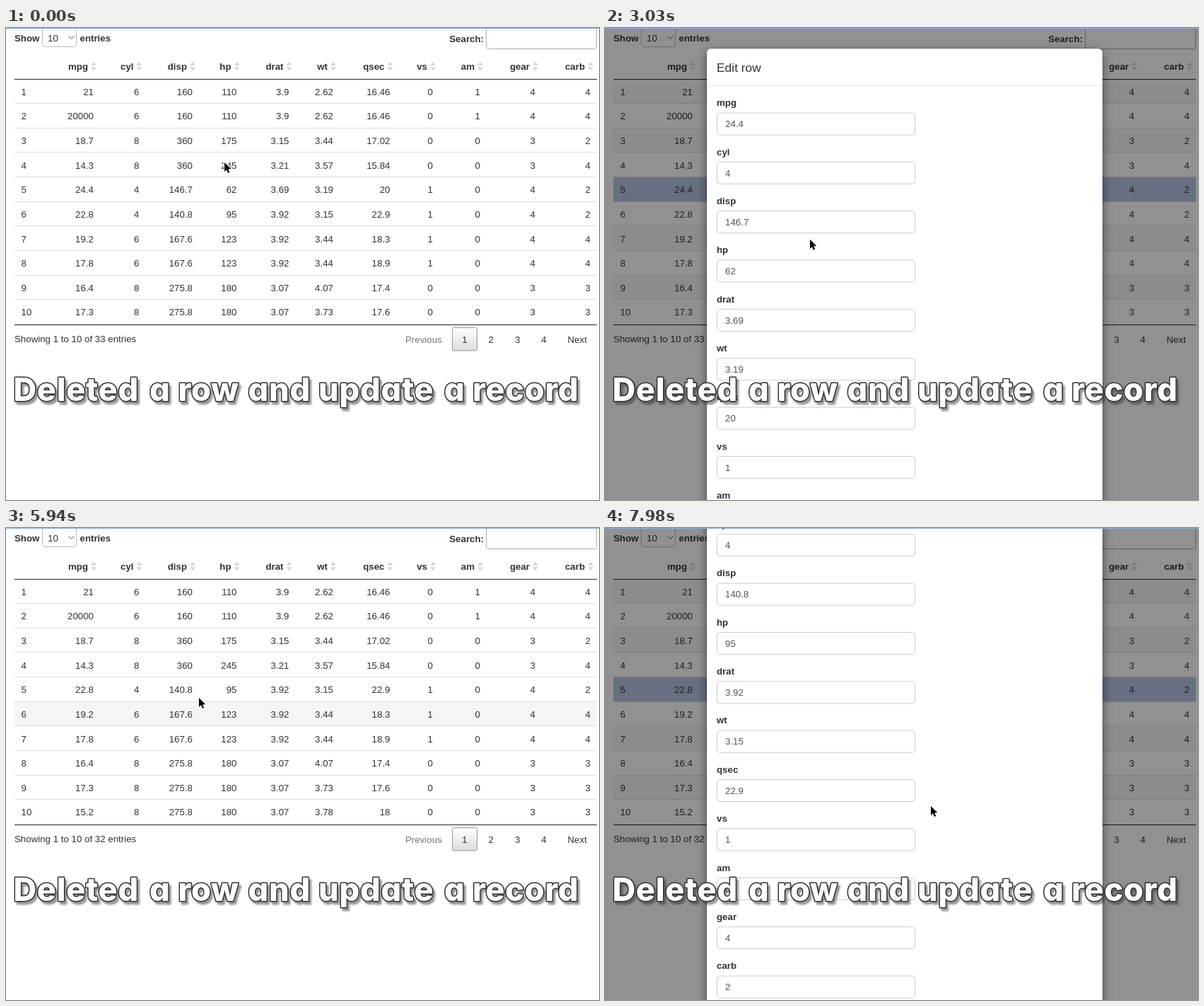
These frames come from a looping animation (839 px wide and 667 px high, 8000 ms). An HTML page with a canvas:

```html
<!DOCTYPE html>
<html lang="en">
<head>
<meta charset="utf-8">
<title>Editable table</title>
<style>
  html, body { margin: 0; width: 839px; height: 667px; overflow: hidden; background: #fff; }
  canvas, svg { position: absolute; left: 0; top: 0; }
  text {
    font: 800 45.2px Inter, sans-serif;
    font-feature-settings: "cv11";
    letter-spacing: .7px;
    fill: #fff; stroke: #333; stroke-width: 3px; paint-order: stroke; stroke-linejoin: round;
    filter: drop-shadow(3px 4px 1px rgba(50, 50, 50, .5));
  }
</style>
</head>
<body>
<canvas id="stage" width="839" height="667"></canvas>
<svg width="839" height="667">
  <text y="527"><tspan x="10.5">Deleted</tspan><tspan x="203">a</tspan><tspan x="243.5">row</tspan><tspan x="342.5">and</tspan><tspan x="442">update</tspan><tspan x="620">a</tspan><tspan x="660">record</tspan></text>
</svg>
<script>
const W = 839, H = 667, LOOP = 8000;
const screen = document.getElementById('stage').getContext('2d');
const layer = new OffscreenCanvas(W, H).getContext('2d');
let ctx = screen;

const HEAD = 72.5, PITCH = 34.65, FIELD = 69.35, MODAL_H = 904.5, MAX_SCROLL = 294.5;
const names = 'mpg cyl disp hp drat wt qsec vs am gear carb'.split(' ');
const rights = [124, 188.5, 264, 326.5, 400.5, 463, 543.5, 604, 671, 749, 827];

// Engine "cyl disp hp drat carb": cars "mpg wt qsec"
const engines = {
  '6 160 110 3.9 4': ['21 2.62 16.46', '20000 2.62 16.46'],
  '8 360 175 3.15 2': ['18.7 3.44 17.02'],
  '8 360 245 3.21 4': ['14.3 3.57 15.84'],
  '4 146.7 62 3.69 2': ['24.4 3.19 20'],
  '4 140.8 95 3.92 2': ['22.8 3.15 22.9'],
  '6 167.6 123 3.92 4': ['19.2 3.44 18.3', '17.8 3.44 18.9'],
  '8 275.8 180 3.07 3': ['16.4 4.07 17.4', '17.3 3.73 17.6', '15.2 3.78 18']
};
const before = Object.entries(engines).flatMap(([engine, cars]) => {
  const [cyl, disp, hp, drat, carb] = engine.split(' ');
  const am = +(disp === '160'), vs = +(cyl < 8 && !am), gear = cyl < 8 ? 4 : 3;
  return cars.map(car => {
    const [mpg, wt, qsec] = car.split(' ');
    return [mpg, cyl, disp, hp, drat, wt, qsec, vs, am, gear, carb];
  });
});
const after = before.filter((_, i) => i !== 4);

// Key times in ms
const OPEN = 2140, REMOVED = 5190, CLOSE = 5230, REOPEN = 6480;
const cursorPath = [
  [0, 309, 190], [1560, 505, 194], [1650, 236, 226], [2610, 236, 226], [3390, 336, 361],
  [3720, 336, 361], [4560, 528, 605], [5280, 545, 632], [5550, 411, 480], [5670, 318, 260],
  [5940, 273, 240], [7000, 282, 205], [7230, 461, 393]
];

const clamp = v => Math.max(0, Math.min(1, v));
const ramp = (t, start, length) => clamp((t - start) / length);
const ease = (t, start, length) => Math.sin(ramp(t, start, length) * Math.PI / 2);

function cursorAt(t) {
  const i = cursorPath.findIndex(k => k[0] > t);
  if (i < 1) return cursorPath.at(i).slice(1);
  const [t0, x0, y0] = cursorPath[i - 1], [t1, x1, y1] = cursorPath[i];
  const u = (t - t0) / (t1 - t0);
  return [x0 + (x1 - x0) * u, y0 + (y1 - y0) * u];
}

function scrollAt(t) {
  return t < 6000
    ? MAX_SCROLL * ease(t, 3455, 750)
    : 110 * ease(t, 7030, 200) + 70.5 * ease(t, 7530, 450);
}

// y is the visual middle of the line
function label(s, x, y, { bold = false, align = 'left', color = '#333', size = 13.3 } = {}) {
  ctx.font = `${bold ? 'bold ' : ''}${size}px "Liberation Sans", Arial, sans-serif`;
  ctx.textAlign = align;
  ctx.fillStyle = color;
  ctx.fillText(s, x, y + size * .355);
}

function box(x, y, w, h, r, stroke, fill) {
  ctx.beginPath();
  ctx.roundRect(x, y, w, h, r);
  if (fill) { ctx.fillStyle = fill; ctx.fill(); }
  if (stroke) { ctx.strokeStyle = stroke; ctx.lineWidth = 1; ctx.stroke(); }
}

function rect(x, y, w, h, color) {
  ctx.fillStyle = color;
  ctx.fillRect(x, y, w, h);
}

function arrows(x, y, w, h, gap, color) {
  ctx.beginPath();
  for (const d of [-1, 1]) {
    ctx.moveTo(x - w, y + d * gap);
    ctx.lineTo(x + w, y + d * gap);
    ctx.lineTo(x, y + d * (gap + h));
  }
  ctx.fillStyle = color;
  ctx.fill();
}

function drawTable(t, dim) {
  const rows = t < REMOVED ? before : after;
  const selected = (t > 1830 && t < REMOVED) || t > REOPEN - 210 ? 4 : -1;
  const hover = t > 230 && !dim ? Math.floor((cursorAt(t - 200)[1] - HEAD) / PITCH) : -1;

  label('Show', 12, 14, { bold: true });
  box(51.5, -4.5, 48, 31, 4, '#bbb');
  label('10', 59, 14);
  ctx.beginPath();
  ctx.moveTo(88.5, 11.5); ctx.lineTo(92.5, 15.5); ctx.lineTo(96.5, 11.5);
  ctx.strokeStyle = '#555';
  ctx.stroke();
  label('entries', 104.5, 14, { bold: true });
  label('Search:', 676, 15.5, { bold: true, align: 'right' });
  box(679.5, -5.5, 156, 35, 3, '#aaa');

  names.forEach((n, i) => {
    label(n, rights[i] - 8, 54, { bold: true, align: 'right' });
    arrows(rights[i], 54, 4, 5, 1.2, '#d6d6d6');
  });

  rows.slice(0, 10).forEach((row, i) => {
    const top = HEAD + i * PITCH, y = top + 17.4;
    if (i === selected) rect(12, top, 824, PITCH, '#b4c3e0');
    else if (i === hover) rect(12, top, 824, PITCH, '#f5f5f5');
    else if (i % 2 === 0) rect(12, top, 824, PITCH, `rgba(0,0,0,${.04 * dim})`);
    if (i) rect(12, Math.round(top) - 1, 824, 1, '#ddd');
    label(i + 1, 21.5, y);
    row.forEach((v, c) => label(v, rights[c], y, { align: 'right' }));
  });
  rect(12, 72, 824, 1, '#222');
  rect(12, 419, 824, 1, '#222');

  label(`Showing 1 to 10 of ${t < REMOVED ? 33 : 32} entries`, 12, 439.5);
  label('Previous', 565, 440, { color: '#777' });
  const shade = ctx.createLinearGradient(0, 423, 0, 456);
  shade.addColorStop(0, '#fff');
  shade.addColorStop(1, '#dcdcdc');
  box(631.5, 423.5, 35, 32.5, 2, '#979797', shade);
  [1, 2, 3, 4].forEach(n => label(n, 611.6 + n * 37.35, 440, { align: 'center' }));
  label('Next', 794.5, 440);
}

function drawModal(top, values, hit, deleteOn) {
  ctx.save();
  ctx.shadowColor = 'rgba(0,0,0,.5)';
  ctx.shadowBlur = 14;
  ctx.shadowOffsetY = 4.7;
  box(144, top, 560, MODAL_H, 5.6, null, '#fff');
  ctx.restore();
  box(144, top, 560, MODAL_H, 5.6, 'rgba(0,0,0,.2)');

  label('Edit row', 158, top + 27, { size: 17.4 });
  rect(144, top + 52, 560, 1, '#e5e5e5');
  names.forEach((n, i) => {
    const y = top + 76.5 + i * FIELD;
    label(n, 158, y, { bold: true });
    box(158.5, y + 14.5, 280, 31, 4, '#ccc');
    label(values[i], 170, y + 30, { color: '#555' });
    if (i === hit) arrows(420, y + 30, 3.5, 4.5, 2, '#555');
  });

  const foot = top + MODAL_H;
  rect(144, foot - 61, 560, 1, '#e5e5e5');
  let x = 422;
  for (const [s, w, gap] of [['Cancel', 65, 9], ['Delete', 61, 9], ['Add', 48, 9], ['Update', 67, 0]]) {
    const on = deleteOn && s === 'Delete';
    box(x + .5, foot - 45, w - 1, 31, 4, on ? '#8c8c8c' : '#ccc', on ? '#e0e0e0' : null);
    label(s, x + w / 2, foot - 29.5, { align: 'center' });
    x += w + gap;
  }
}

function drawCursor(x, y, beam) {
  ctx.save();
  ctx.translate(x, y);
  ctx.lineJoin = 'round';
  ctx.beginPath();
  if (beam) {
    for (const d of [-1, 1]) {
      ctx.moveTo(-3, d * 8);
      ctx.quadraticCurveTo(0, d * 8, 0, d * 5);
      ctx.quadraticCurveTo(0, d * 8, 3, d * 8);
    }
    ctx.moveTo(0, -6); ctx.lineTo(0, 6);
    ctx.moveTo(-1.5, 2); ctx.lineTo(1.5, 2);
    ctx.strokeStyle = '#111';
    ctx.lineWidth = 1.2;
    ctx.stroke();
  } else {
    const arrow = new Path2D('M0 0V13L3 10.3L5 15L7.2 14L5.2 9.5L9.3 9.3Z');
    ctx.strokeStyle = '#fff';
    ctx.lineWidth = 2;
    ctx.stroke(arrow);
    ctx.fillStyle = '#000';
    ctx.fill(arrow);
  }
  ctx.restore();
}

function draw(t) {
  const again = t > 6000, start = again ? REOPEN : OPEN;
  const closing = !again && t > CLOSE;
  const dim = closing ? 1 - ramp(t, CLOSE + 150, 150) : ramp(t, start - 150, 150);
  const alpha = closing ? 1 - ramp(t, CLOSE, 115) : ramp(t, start, 150);
  const slide = closing ? ease(t, CLOSE, 300) : 1 - ease(t, start, 300);
  const top = 29 - scrollAt(t) - slide * MODAL_H / 4;
  const [x, y] = cursorAt(t);

  // Field under the pointer, once the dialog has settled
  const pos = (y - top - 91) / FIELD;
  const over = !closing && t > start + 350 && x > 158 && x < 439 && pos >= 0 && pos % 1 < .46;
  const hit = over ? Math.floor(pos) : -1;

  rect(0, 0, W, H, '#fff');
  drawTable(t, dim);
  rect(0, 0, W, H, `rgba(0,0,0,${.43 * dim})`);

  if (alpha > 0) {
    ctx = layer;
    ctx.clearRect(0, 0, W, H);
    drawModal(top, again ? after[4] : before[4], hit, !again && t > 4560);
    ctx = screen;
    ctx.globalAlpha = alpha;
    ctx.drawImage(layer.canvas, 0, 0);
    ctx.globalAlpha = 1;
  }
  rect(0, 0, W, 1, '#86aede');
  drawCursor(x, y, over);
}

const began = performance.now();
function frame() {
  draw((performance.now() - began) % LOOP);
  requestAnimationFrame(frame);
}
frame();
</script>
</body>
</html>
```
